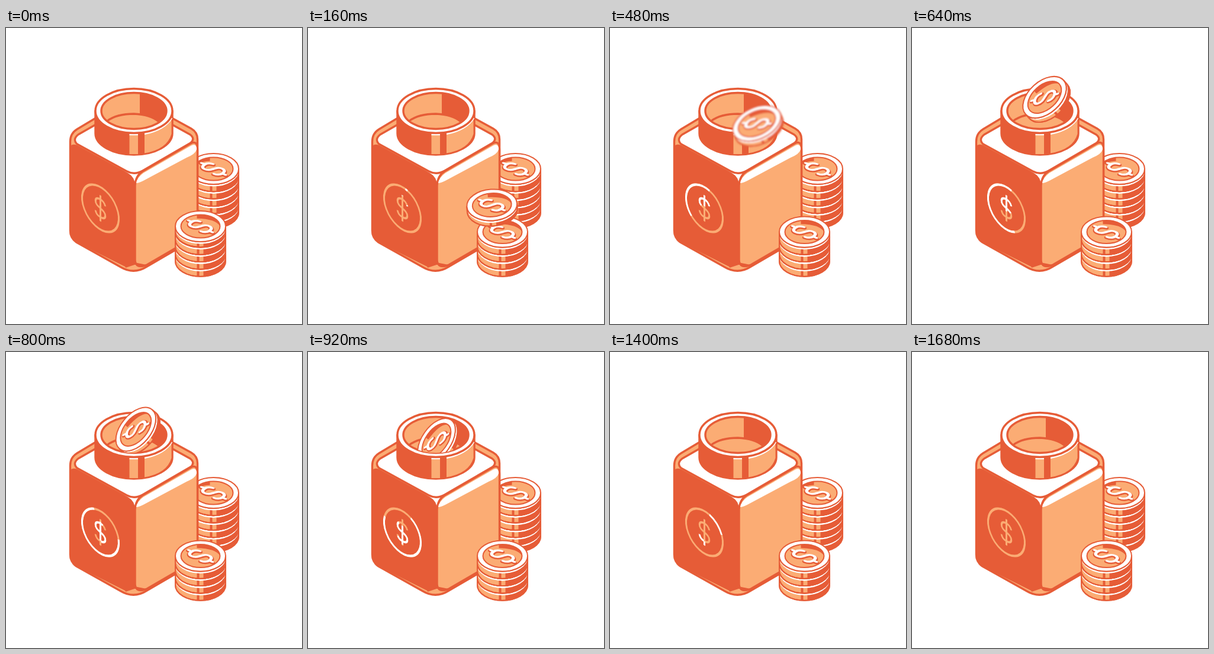
An HTML page for the animation above (2000 ms loop, 500 by 500 pixels).

```html
<!DOCTYPE html>
<html lang="en">
<head>
<meta charset="utf-8">
<title>Savings jar</title>
<style>
  html, body { margin: 0; width: 100%; height: 100%; overflow: hidden; background: #fff; }
  svg { display: block; width: 100vw; height: 100vh; }
  .o { stroke: #e65c37; stroke-width: 3.4; stroke-linejoin: round; stroke-linecap: round; }
  .t { stroke: #e65c37; stroke-width: 2; stroke-linejoin: round; }
  .d { fill: #e65c37; }
  .l { fill: #fbac74; }
  .w { fill: #fff; }
  .n { fill: none; }
  .wl { fill: none; stroke: #fff; stroke-width: 2.6; }
  .badge path { fill: none; stroke-width: 3.5; }
</style>
</head>
<body>
<svg viewBox="0 0 500 500">
  <defs>
    <clipPath id="mouth"><path d="M0 0H500V140H271A55 30.500 0 0 1 161 140H0Z"/></clipPath>
    <filter id="soft" x="-30%" y="-40%" width="160%" height="180%"><feGaussianBlur id="blur" stdDeviation="0"/></filter>
  </defs>
  <g id="back"></g>

  <g id="body">
    <path class="l o" d="M108.500 192Q108.500 178 120 171L150 153H282L313 170Q323.500 176 323.500 188V338Q323.500 352 312 360L238 403Q216 417 194 404L119 362Q108.500 355 108.500 342Z"/>
    <path class="w" d="M200 241L217 246L236 241L219 266Z"/>
    <path class="d" d="M107 204Q109 194 120 198L206 245Q218 252 218 266V398L203 404L119 362Q107 355 107 342Z"/>
    <path class="l o" d="M218 266Q219 249 231 242L312 195Q323.500 189 323.500 205V338Q323.500 350 312 357L238 400Q219 408 218 392Z"/>
    <path class="w" d="M220 262Q221 253 232 245L313 198.500Q322 194 322 205Q320 213 305 219L232 258Q224 262 220 262Z"/>
    <path class="n o" d="M203 403L218 398L238 402"/>
    <path class="w o" d="M120 196Q112 188 122 180L150 164H282L311 180Q320 187 312 194L231 241Q217 249 204 242Z"/>
  </g>

  <g id="neck">
    <path class="d o" d="M151 140V178A65 36 0 0 0 281 178V140Z"/>
    <path class="l" d="M208.500 177H223V213H208.500Z"/>
    <path class="l" d="M234 176Q268 170 279.500 150V179Q272 205 234 211.500Z"/>
    <path class="wl" d="M208.500 180H223M234 179Q268 172 280 152"/>
    <ellipse class="w o" cx="216" cy="140" rx="65" ry="37.500"/>
    <ellipse class="l" cx="216" cy="140" rx="55" ry="30.500"/>
    <path class="d" d="M226 110A55 30.500 0 0 1 258 160Q245 149 226 146Z"/>
    <path class="n o" d="M171 157Q187 145 216 145Q244 146 258 158"/>
    <ellipse class="n o" cx="216" cy="140" rx="55" ry="30.500"/>
  </g>

  <g class="badge" transform="matrix(.866 .5 0 1 159.500 304.500)">
    <g id="plain" stroke="#fbac74"></g>
    <g id="shine" stroke="#fff"></g>
  </g>

  <g id="front"></g>
  <g id="flight"><g id="haze"><g id="coin"></g></g></g>
</svg>
<script>
const $ = id => document.getElementById(id);
const RX = 42.5, RY = 26, THICK = 12.3;
const S = 'M9.500 -8C8 -13 4 -15 0 -15C-6 -15 -9.500 -12 -9.500 -8C-9.500 -2 -4 -1.500 0 0C5 1.500 9.500 3 9.500 8C9.500 12 6 15 0 15C-5 15 -9 13 -9.500 8';

const rimY = (x, a = RX, b = RY) => b * Math.sqrt(1 - x * x / (a * a));

// Part of a coin's edge between two x positions
function band(x0, x1, h, cls) {
  const y0 = rimY(x0), y1 = rimY(x1);
  return `<path class="${cls}" d="M${x0} ${y0}A${RX} ${RY} 0 0 0 ${x1} ${y1}v${h}A${RX} ${RY} 0 0 1 ${x0} ${y0 + h}Z"/>`;
}

function edge(h) {
  const r = RX - 1;
  return band(-RX, RX, h, 'l t') + band(-6, -2, h, 'd') + band(5, RX, h, 'd') +
    `<path class="wl" d="M${-r} 2.300A${r} ${RY} 0 0 0 ${r} 2.300"/>` +
    band(-RX, RX, h, 'n t');
}

function face(darkLeft) {
  const a = 33, b = 19.5, x = -6, y = -rimY(x, a, b);
  const end = darkLeft ? -a : a, s = darkLeft ? 0 : 1;
  const shade = `M${x} ${y}A${a} ${b} 0 0 ${s} ${end} 0Q${end * .8} ${-b * .65} ${x} ${-b * .68}Z`;
  const mark = `<path d="${S}M0 -20V-15M0 15V20"/>`;
  return `<ellipse class="w t" rx="${RX}" ry="${RY}"/>
    <ellipse class="l" rx="${a}" ry="${b}"/><path class="d" d="${shade}"/>
    <ellipse class="n t" rx="${a}" ry="${b}"/>
    <g fill="none" stroke-linecap="round">
      <g stroke="#e65c37" stroke-width="7.500" transform="matrix(.75 -.45 1 .5 0 1.500)">${mark}</g>
      <g stroke="#fff" stroke-width="4.500" transform="matrix(.75 -.45 1 .5 0 0)">${mark}</g></g>`;
}

function stack(id, x, y, count, darkLeft) {
  let out = '';
  for (let i = count - 1; i >= 0; i--)
    out += `<g transform="translate(${x} ${y + i * THICK})">${edge(THICK)}${i ? '' : face(darkLeft)}</g>`;
  $(id).innerHTML = out;
}

stack('back', 350.5, 238, 6, true);
stack('front', 328.5, 344.5, 4, false);
$('coin').innerHTML = edge(9) + face(false);

const R = 35.8;
const ring = `M0 ${-R}A${R} ${R} 0 0 0 0 ${R}A${R} ${R} 0 0 0 0 ${-R}`;
const lines = `<path pathLength="1" transform="rotate(16)" d="${ring}"/>` +
  [S, 'M0 -22V22'].map(d => `<path pathLength="1" d="${d}"/>`).join('');
$('plain').innerHTML = $('shine').innerHTML = lines;

// time, x, y, turn, half width, half height, blur
const keys = [
  [0, 328.5, 335, 0, 42.5, 26, 0],
  [320, 279.5, 234, -12, 42.5, 27, 1.8],
  [480, 248, 161, -25, 43, 26.5, 1.5],
  [640, 224, 117, -42, 43, 27, .15],
  [680, 222, 115.5, -45, 43, 26.5, .1],
  [920, 217, 150, -55, 43, 24.5, .7],
  [1120, 214, 200, -62, 43, 24, 1.2],
  [1160, 213, 212, -63, 43, 24, 1.2]
];

function slope(i, k) {
  if (i === 0) return 0;
  const a = keys[i - 1], b = keys[Math.min(i + 1, keys.length - 1)];
  return (b[k] - a[k]) / (b[0] - a[0]);
}

function pose(t) {
  let i = 0;
  while (i < keys.length - 2 && t >= keys[i + 1][0]) i++;
  const a = keys[i], b = keys[i + 1], d = b[0] - a[0];
  const u = (t - a[0]) / d, u2 = u * u, u3 = u2 * u;
  return a.map((v, k) => v * (2 * u3 - 3 * u2 + 1) + b[k] * (3 * u2 - 2 * u3) +
    d * (slope(i, k) * (u3 - 2 * u2 + u) + slope(i + 1, k) * (u3 - u2)));
}

const clamp = v => Math.max(0, Math.min(1, v));

function drawShine(t) {
  const head = clamp((t - 145) / 800), tail = clamp((t - 720) / 800);
  const len = head - tail;
  $('shine').style.display = len > .001 ? '' : 'none';
  for (const p of $('shine').children) {
    p.setAttribute('stroke-dasharray', `${len} 3`);
    p.setAttribute('stroke-dashoffset', -tail);
  }
}

function drawCoin(t) {
  const shown = t < 1160;
  $('flight').style.display = shown ? '' : 'none';
  if (!shown) return;
  const [, x, y, turn, a, b, blur] = pose(t);
  $('coin').setAttribute('transform',
    `translate(${x} ${y}) rotate(${turn}) scale(${a / RX} ${b / RY})`);
  const soft = Math.max(0, blur);
  $('blur').setAttribute('stdDeviation', soft);
  if (soft > .2) $('haze').setAttribute('filter', 'url(#soft)');
  else $('haze').removeAttribute('filter');
  // Once above the opening, the coin drops behind the front rim
  if (t >= 600) $('flight').setAttribute('clip-path', 'url(#mouth)');
  else $('flight').removeAttribute('clip-path');
}

function draw(now) {
  const t = Math.min(1680, Math.floor((now % 2000) / 40) * 40);
  drawShine(t);
  drawCoin(t);
}

function tick(now) {
  draw(now);
  requestAnimationFrame(tick);
}
draw(0);
requestAnimationFrame(tick);
</script>
</body>
</html>
```
